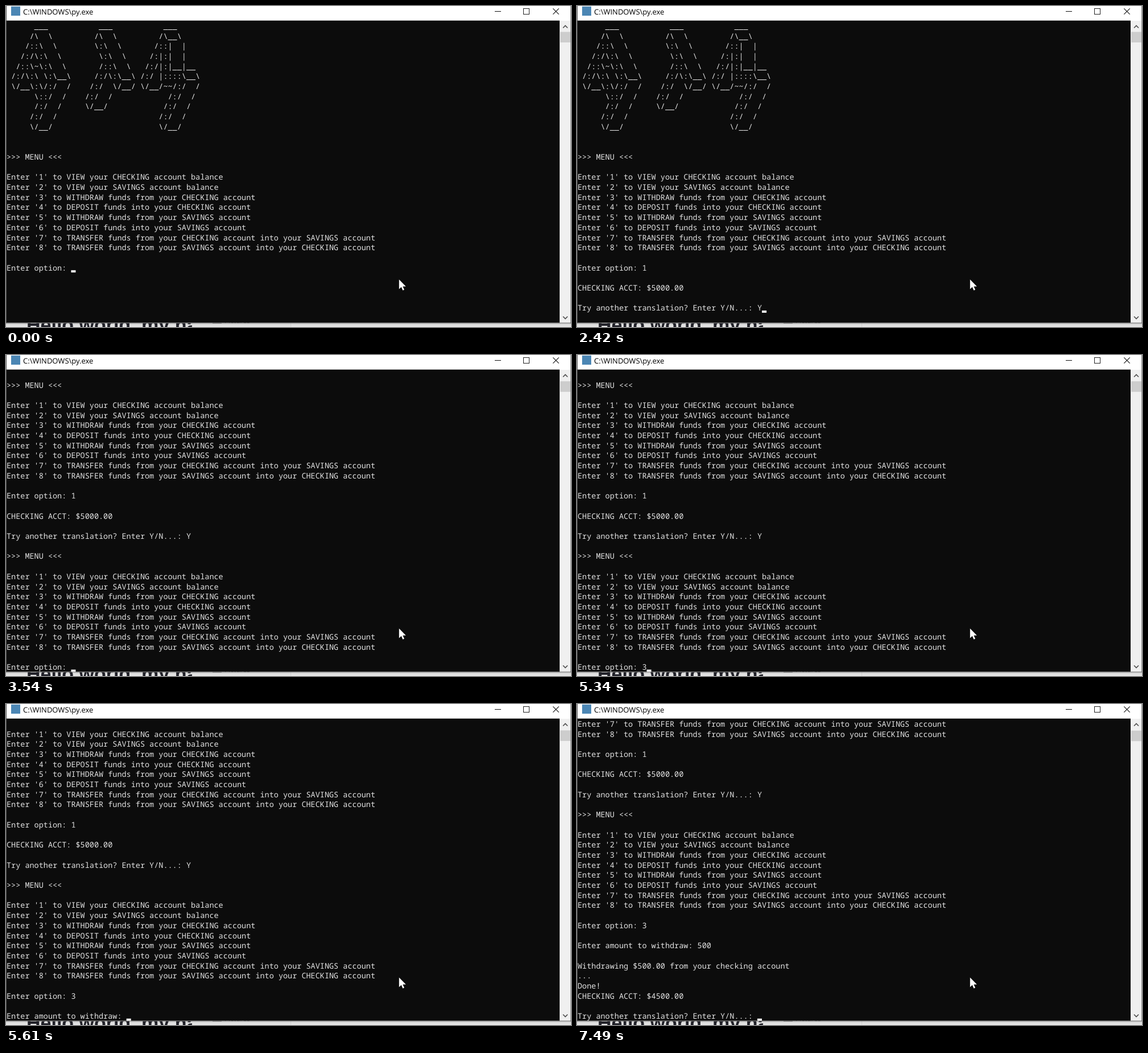
Write an HTML page with a canvas that moves like this. It is 993 by 564 pixels and loops after 8 s.

```html
<!DOCTYPE html>
<html lang="en">
<head>
<meta charset="utf-8">
<title>Console session</title>
<style>
html, body { margin: 0; width: 100%; height: 100%; overflow: hidden; background: #fff; }
canvas { display: block; }
</style>
</head>
<body>
<canvas id="stage" width="993" height="564"></canvas>
<script>
const ctx = document.getElementById('stage').getContext('2d');
const LOOP = 8000, COL = 8.1, ROW = 17.7, LEFT = 1, TOP = 26, BOTTOM = 557, ROWS = 30;

const banner = String.raw`
      ___           ___           ___
     /\  \         /\  \         /\__\
    /::\  \        \:\  \       /::|  |
   /:/\:\  \        \:\  \     /:|:|  |
  /::\~\:\  \       /::\  \   /:/|:|__|__
 /:/\:\ \:\__\     /:/\:\__\ /:/ |::::\__\
 \/__\:\/:/  /    /:/  \/__/ \/__/~~/:/  /
      \::/  /    /:/  /            /:/  /
      /:/  /     \/__/            /:/  /
     /:/  /                      /:/  /
     \/__/                       \/__/`.split('\n').slice(1);

const menu = ['>>> MENU <<<', '', ...[
  'VIEW your CHECKING account balance',
  'VIEW your SAVINGS account balance',
  'WITHDRAW funds from your CHECKING account',
  'DEPOSIT funds into your CHECKING account',
  'WITHDRAW funds from your SAVINGS account',
  'DEPOSIT funds into your SAVINGS account',
  'TRANSFER funds from your CHECKING account into your SAVINGS account',
  'TRANSFER funds from your SAVINGS account into your CHECKING account'
].map((label, i) => `Enter '${i + 1}' to ${label}`), ''];

const option = 'Enter option: ';
const again = 'Try another translation? Enter Y/N...: ';
const amount = 'Enter amount to withdraw: ';

// Each step: start time, cursor shown, text to append.
const steps = [
  [0, 1, [...banner, '', '', ...menu, option].join('\n')],
  [530, 0],
  [670, 1, '1'],
  [940, 1, '\n\nCHECKING ACCT: $5000.00\n\n' + again],
  [1600, 0],
  [2150, 1],
  [2420, 1, 'Y'],
  [2680, 0],
  [3150, 1],
  [3480, 1, '\n'],
  [3540, 1, ['', ...menu, option].join('\n')],
  [4210, 0],
  [4740, 1],
  [5270, 0],
  [5340, 1, '3'],
  [5540, 1, '\n'],
  [5610, 1, '\n' + amount],
  [6340, 0],
  [6750, 1, '5'],
  [6890, 1, '0'],
  [7020, 1, '0'],
  [7420, 0],
  [7490, 1, '\n\nWithdrawing $500.00 from your checking account\n...\nDone!\nCHECKING ACCT: $4500.00\n\n' + again]
];

function rect(x, y, w, h, color) {
  ctx.fillStyle = color;
  ctx.fillRect(x, y, w, h);
}

function line(color, width, ...pts) {
  ctx.strokeStyle = color;
  ctx.lineWidth = width;
  ctx.beginPath();
  pts.forEach(([x, y]) => ctx.lineTo(x, y));
  ctx.stroke();
}

function text(str, x, y, font, color) {
  ctx.font = font;
  ctx.fillStyle = color;
  ctx.fillText(str, x, y);
}

function drawBackdrop() {
  rect(0, 0, 993, 564, '#f4f4f4');
  ctx.save();
  ctx.beginPath();
  ctx.rect(0, BOTTOM, 327, 7);
  ctx.clip();
  text('Hello world, my name', 36, 572, 'bold 34px "Liberation Sans", Arial, sans-serif', '#24242c');
  ctx.restore();
  rect(363, BOTTOM, 16, 1, '#777');
  text('Pictures', 384, 557, '12px "Open Sans", sans-serif', '#444');
  rect(500, BOTTOM, 1, 7, '#e4e4e4');
  const shade = ctx.createLinearGradient(0, BOTTOM, 0, 564);
  shade.addColorStop(0, 'rgba(0,0,0,.16)');
  shade.addColorStop(1, 'rgba(0,0,0,.03)');
  rect(0, BOTTOM, 993, 7, shade);
}

function drawWindow(scroll) {
  rect(0, 0, 993, TOP, '#fff');
  rect(9, 1, 16, 16, '#4b86b4');
  text('C:\\WINDOWS\\py.exe', 30, 14.7, '13px "Open Sans", "Noto Sans", sans-serif', '#000');
  line('#111', 1, [859, 9.5], [870, 9.5]);
  ctx.strokeStyle = '#222';
  ctx.strokeRect(909.5, 4.5, 10, 10);
  line('#111', 1.1, [961.3, 4.3], [971.7, 14.7]);
  line('#111', 1.1, [971.7, 4.3], [961.3, 14.7]);

  rect(0, TOP - 0.4, 973, BOTTOM - TOP, '#0c0c0c');
  rect(973, TOP, 19, BOTTOM - TOP, '#f0f0f0');
  rect(974, 45.5 + scroll * 0.06, 18, 18.5, '#cdcdcd');
  line('#505050', 1.7, [979, 38.5], [983, 34.5], [987, 38.5]);
  line('#505050', 1.7, [979, 545.5], [983, 549.5], [987, 545.5]);
  rect(0, 0, 1, BOTTOM, '#555');
  rect(992, 0, 1, BOTTOM, '#888');
  rect(0, BOTTOM - 0.5, 993, 1, '#666');
}

function drawPointer() {
  const shape = [[0, 0], [0, 17], [3.9, 13.3], [6.6, 19.2], [9.2, 18], [6.6, 12.3], [12, 12.2]];
  ctx.beginPath();
  shape.forEach(([x, y]) => ctx.lineTo(690.8 + x, 480.5 + y));
  ctx.closePath();
  ctx.strokeStyle = '#000';
  ctx.lineWidth = 1;
  ctx.stroke();
  ctx.fillStyle = '#fff';
  ctx.fill();
}

function draw(t) {
  const past = steps.filter(s => s[0] <= t);
  const cursorOn = past[past.length - 1][1];
  const lines = past.map(s => s[2] || '').join('').split('\n');
  const scroll = Math.max(0, lines.length - ROWS);
  const rows = lines.slice(scroll);

  drawBackdrop();
  drawWindow(scroll);

  ctx.save();
  ctx.beginPath();
  ctx.rect(0, TOP, 973, BOTTOM - TOP);
  ctx.clip();
  rows.forEach((str, i) =>
    text(str, LEFT, TOP + i * ROW + 13.8, '500 13.5px "Noto Sans Mono", monospace', '#e2e2e2'));
  if (cursorOn) {
    const last = rows.length - 1;
    rect(LEFT + rows[last].length * COL, TOP + last * ROW + 13.4, COL, 4, '#f2f2f2');
  }
  ctx.restore();
  drawPointer();
}

ctx.textRendering = 'geometricPrecision';
function frame(now) {
  draw(now % LOOP);
  requestAnimationFrame(frame);
}
requestAnimationFrame(frame);
</script>
</body>
</html>
```
